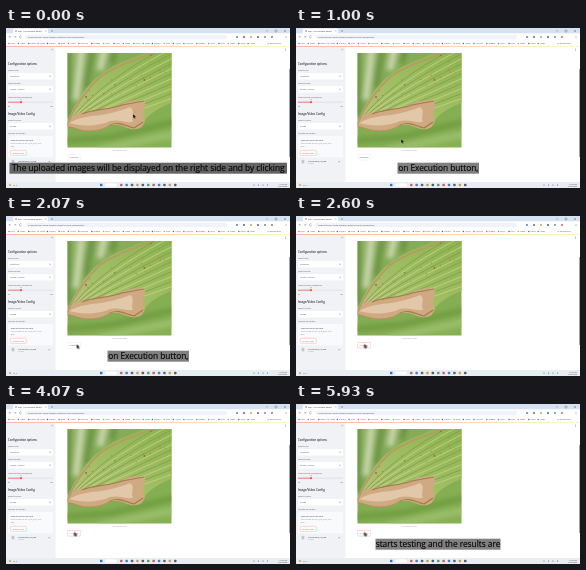
An HTML page for the animation above (6 s loop, 284 by 160 pixels).

```html
<!DOCTYPE html>
<html lang="en">
<head>
<meta charset="utf-8">
<title>Leaf check demo</title>
<style>
html, body { margin: 0; width: 100%; height: 100%; overflow: hidden; background: #fff; }
svg { display: block; width: 284px; height: 160px; }
text { font-family: "Open Sans", "Noto Sans", sans-serif; }
.caption text { font-size: 8.3px; text-anchor: middle; fill: #050505; stroke: #050505; stroke-width: .15; }
</style>
</head>
<body>
<svg id="stage" viewBox="0 0 284 160" xmlns="http://www.w3.org/2000/svg">
  <defs>
    <clipPath id="photo"><rect x="61.5" y="25" width="104" height="94.5"/></clipPath>
    <clipPath id="blade"><use href="#leaf"/></clipPath>
    <linearGradient id="back" x2=".6" y2="1">
      <stop offset="0" stop-color="#8fb263"/>
      <stop offset=".4" stop-color="#83aa55"/>
      <stop offset="1" stop-color="#86b052"/>
    </linearGradient>
    <linearGradient id="green" x1=".1" y1="1" x2=".9" y2="0">
      <stop offset="0" stop-color="#c0bf82"/>
      <stop offset=".4" stop-color="#a3bf66"/>
      <stop offset="1" stop-color="#8fb450"/>
    </linearGradient>
    <linearGradient id="accent">
      <stop offset="0" stop-color="#ff8a7a"/>
      <stop offset="1" stop-color="#fff3b0"/>
    </linearGradient>
    <filter id="soft"><feGaussianBlur stdDeviation="2.5"/></filter>
    <filter id="haze"><feGaussianBlur stdDeviation=".7"/></filter>
    <path id="leaf" d="M61 96C66 82 74 67 86 54C97 43 110 36 124 31L140 24H167V74C155 79 144 85 139 92C138 99 132 102 126 101C118 99 112 95 104 97C96 103 84 104 75 102L61 98Z"/>
  </defs>

  <g id="chrome"></g>
  <g id="sidebar"></g>

  <g clip-path="url(#photo)">
    <rect x="61" y="25" width="105" height="95" fill="url(#back)"/>
    <g filter="url(#soft)" fill="none" stroke-width="6">
      <path d="M76 18L70 72M99 18L94 42" stroke="#cfd9b4"/>
      <path d="M62 18V88M87 18L80 60M110 18L106 36" stroke="#6b9443"/>
      <path d="M58 113L105 109L168 94" stroke="#6f9d40"/>
      <path d="M92 122L170 106" stroke="#9cc070"/>
    </g>
    <g filter="url(#haze)">
      <use href="#leaf" fill="url(#green)"/>
      <g clip-path="url(#blade)">
        <g id="veins" fill="none"></g>
        <path d="M61 90C70 86 77 83 87 84C97 80 108 81 116 76C124 72 133 71 139 74C140 81 134 85 139 92L134 104H61Z" fill="#cfa981"/>
        <path d="M63 95C74 89 84 88 95 87C106 85 114 83 124 79C130 82 124 89 127 94C119 95 112 91 104 93C94 98 76 99 63 95Z" fill="#e2c7a9"/>
        <path d="M76 86C88 81 103 82 116 77L138 73M104 97C114 93 119 98 128 100L137 94" fill="none" stroke="#a87a4b" stroke-width="1.2"/>
        <path d="M61 97C68 80 80 62 94 49C109 38 127 33 147 25" fill="none" stroke="#b59c66" stroke-width="1.8"/>
        <g id="spots"></g>
      </g>
      <path d="M61 98L75 102C84 104 96 103 104 97" fill="none" stroke="#b58a58" stroke-width=".8"/>
    </g>
  </g>

  <g id="page"></g>
  <g id="captions"></g>
  <g id="cursor">
    <path id="arrow" d="M0 0V4.3L1.1 3.4L1.9 5L2.7 4.6L2 3.1H3.3Z" fill="#111" stroke="#fff" stroke-width=".2"/>
    <path id="hand" d="M.2 0Q.9 -.4 1 .3V1.2L2.3 1.5Q2.7 1.7 2.5 2.3L2.1 3.2H.6L-.5 2Q-.4 1.4 .2 1.8Z" fill="#555" stroke="#111" stroke-width=".5"/>
  </g>
</svg>
<script>
const LOOP = 6000;
const $ = id => document.getElementById(id);

function add(parent, tag, attrs, content) {
  const el = document.createElementNS("http://www.w3.org/2000/svg", tag);
  for (const key in attrs) el.setAttribute(key, attrs[key]);
  if (content) el.textContent = content;
  return parent.appendChild(el);
}
const rect = (g, x, y, width, height, fill, more) =>
  add(g, "rect", { x, y, width, height, fill, ...more });
const dot = (g, cx, cy, r, fill) => add(g, "circle", { cx, cy, r, fill });
const line = (g, d, stroke, width = .4) =>
  add(g, "path", { d, stroke, "stroke-width": width, fill: "none" });
const label = (g, x, y, text, size = 2.1, fill = "#4d505a", more) =>
  add(g, "text", { x, y, "font-size": size, fill, ...more }, text);

function seeded(seed) {
  return () => (seed = seed * 16807 % 2147483647) / 2147483647;
}

function drawChrome(g) {
  const tints = ["#c9625a", "#4f80c0", "#5c6470", "#c9a050", "#555c68", "#5b9a75"];
  const tint = i => tints[i % tints.length];

  rect(g, 0, 0, 284, 5.5, "#d6e2f2");
  rect(g, 7, .8, 35, 5, "#fff", { rx: 1.2 });
  dot(g, 10, 3, .8, "#d95044");
  label(g, 12, 3.8, "app · Leaf disease detect", 2.1, "#333");
  line(g, "M39 2.4l1.2 1.2m0 -1.2l-1.2 1.2M45 3h2m-1 -1v2", "#555", .3);
  line(g, "M260 3h2M269 2h2v2h-2ZM278 2l2 2m0 -2l-2 2", "#444", .3);

  rect(g, 0, 5.5, 284, 7, "#fff");
  line(g, "M5 9H2.8l1 -1M8 9h2.2l-1 -1M15.5 8a1.2 1.2 0 1 0 .2 1.6", "#666");
  rect(g, 19, 6.8, 202, 4.4, "#f0f3f8", { rx: 2.2 });
  label(g, 22, 9.8, "localhost:8501/#leaf-disease-detection-and-classification", 2.15, "#444");
  for (let i = 0; i < 6; i++) dot(g, 231 + i * 7, 9, 1, tint(i + 1));
  dot(g, 280, 9, .5, "#555");

  rect(g, 0, 12.5, 284, 6, "#fff");
  const marks = ["Mail", "Video", "Maps", "News", "Papers", "Data", "Notes", "Courses", "Images", "Tools"];
  for (let i = 0, x = 3; x < 247; i++) {
    const name = marks[i % marks.length];
    dot(g, x, 15.4, .75, tint(i * 5));
    label(g, x + 1.6, 16.2, name, 2.1, "#555");
    x += 4.5 + name.length * 1.2;
  }
  label(g, 261, 16.2, "All Bookmarks", 2.1, "#555");
  rect(g, 0, 18.2, 284, .7, "url(#accent)");

  rect(g, 0, 154, 284, 6, "#e8edf4");
  dot(g, 4, 157, 1.1, "#d9ad4c");
  label(g, 7, 157.8, "24°C", 1.9);
  rect(g, 94, 155.8, 2.4, 2.4, "#2475c7");
  rect(g, 99, 155.5, 12, 3, "#fff", { rx: 1.5 });
  for (let i = 0; i < 11; i++) rect(g, 114 + i * 5.4, 155.7, 2.5, 2.5, tint(i), { rx: .8 });
  for (let i = 0; i < 4; i++) dot(g, 248 + i * 4.5, 157, .6, "#59616d");
  label(g, 281, 156.8, "10:42 AM", 1.8, "#333", { "text-anchor": "end" });
  label(g, 281, 159, "12/05/2023", 1.8, "#333", { "text-anchor": "end" });
}

function select(g, y, title, value) {
  label(g, 2, y - 2.4, title);
  rect(g, 2, y, 45, 6.6, "#fff", { rx: .8 });
  label(g, 4, y + 4.1, value);
  line(g, `M43.2 ${y + 2.8}l.9 .9l.9 -.9`, "#444");
}

function drawSidebar(g) {
  const bold = { "font-weight": 600 };
  rect(g, 0, 18.9, 49.5, 135.1, "#f0f2f6");
  line(g, "M45.4 20.7l1.6 1.6m0 -1.6l-1.6 1.6", "#777", .35);
  label(g, 2, 37.3, "Configuration options", 2.75, "#30333f", bold);
  select(g, 45, "Select Task", "Detection");
  select(g, 58, "Select Model", "yolov8_custom");
  label(g, 2, 69.7, "Select Model Confidence");
  label(g, 15, 72.4, "25", 2, "#ff4b4b", { "text-anchor": "middle" });
  line(g, "M2 74.2H47", "#d3d6dd", .6);
  line(g, "M2 74.2H15", "#ff4b4b", .7);
  dot(g, 15, 74.2, 1.1, "#ff4b4b");
  label(g, 2, 78.8, "25", 1.9);
  label(g, 47, 78.8, "100", 1.9, "#4d505a", { "text-anchor": "end" });
  label(g, 2, 86.8, "Image/Video Config", 2.85, "#30333f", bold);
  select(g, 95, "Select Source", "Image");
  label(g, 2, 106, "Choose an image...");
  rect(g, 2, 108, 45, 21.5, "#f9fafc", { rx: .8 });
  label(g, 4.7, 113, "Drag and drop file here", 2.1, "#30333f");
  label(g, 4.7, 116, "Limit 200MB per file • JPG, JPEG, PNG,", 1.8, "#858993");
  label(g, 4.7, 118.5, "BMP", 1.8, "#858993");
  rect(g, 4.3, 122.3, 16, 5, "#fff", { rx: .8, stroke: "#ff8585", "stroke-width": .35 });
  label(g, 12.3, 125.6, "Browse files", 2.1, "#ff4b4b", { "text-anchor": "middle" });
  rect(g, 5.5, 131.8, 3, 3.6, "#d5d8df", { rx: .5 });
  line(g, "M6.2 133h1.6M6.2 134.2h1.6", "#777b85", .4);
  label(g, 12, 133.7, "leaf-sample (14).jpg", 2, "#30333f");
  label(g, 12, 136.4, "21.4KB", 1.7, "#858993");
  line(g, "M42.5 133l1.3 1.3m0 -1.3l-1.3 1.3", "#777", .4);
}

function drawLeafDetails() {
  for (let i = 0; i < 12; i++) {
    const y = 30 + i * 5;
    line($("veins"), `M61 97Q${88 + i * 2.5} ${57 + i * 3} 167 ${y - 15}`,
      i % 2 ? "#bdd080" : "#7fa64a", 1);
  }
  const rnd = seeded(41);
  for (let i = 0; i < 38; i++) {
    const x = 80 + rnd() * 80;
    const y = 112 - x * .5 + (rnd() - .5) * 28;
    dot($("spots"), x, y, .3 + rnd() * .6, i % 3 ? "#ad8c58" : "#8a6a3a");
  }
}

function drawPage(g) {
  dot(g, 279.5, 21, .4, "#555");
  dot(g, 279.5, 22.4, .4, "#555");
  rect(g, 283.2, 41, .8, 88, "#8b8e94");
  label(g, 113.5, 123, "Uploaded Image", 1.9, "#92959d", { "text-anchor": "middle" });
  const button = (color, edge) => {
    const b = add(g, "g", {});
    rect(b, 61.7, 126.5, 13, 5.5, "#fff", { rx: .8, stroke: edge, "stroke-width": .35 });
    label(b, 68.2, 130, "Execution", 2.1, color, { "text-anchor": "middle" });
    return b;
  };
  button("#555963", "#e2e4e8");
  return button("#ff6a6a", "#ff9a9a");
}

// Visible from one time up to another, with hard cuts.
function show(el, from, to) {
  const steps = [[0, from === 0], [from, true], [to, false], [LOOP, to === LOOP]]
    .filter(([t], i) => !(i === 0 && from === 0) && !(i === 2 && to === LOOP));
  el.animate(steps.map(([t, on]) => ({
    offset: t / LOOP, opacity: on ? 1 : 0, easing: "steps(1, end)"
  })), { duration: LOOP, iterations: Infinity });
}

drawChrome($("chrome"));
drawSidebar($("sidebar"));
drawLeafDetails();
const hover = drawPage($("page"));

// text, left, right, box colour, start, end
const captions = [
  ["The uploaded images will be displayed on the right side and by clicking", 3.5, 281, "#646464", 0, 340],
  ["on Execution button,", 101.5, 183, "#808080", 340, 2330],
  ["starts testing and the results are", 79.5, 204.5, "#808080", 4400, LOOP]
];
for (const [text, left, right, color, from, to] of captions) {
  const g = add($("captions"), "g", { class: "caption" });
  rect(g, left, 134.7, right - left, 11, color);
  add(g, "text", { x: (left + right) / 2, y: 143 }, text);
  show(g, from, to);
}

const ARRIVE = 2200;
const path = [[0, 127, 86], [1000, 105, 111], [1530, 99, 125], [ARRIVE, 68.3, 128.6], [LOOP, 68.3, 128.6]];
$("cursor").animate(path.map(([t, x, y]) => ({
  offset: t / LOOP, transform: `translate(${x}px, ${y}px)`, easing: "ease-in-out"
})), { duration: LOOP, iterations: Infinity });
show(hover, ARRIVE - 60, LOOP);
show($("arrow"), 0, ARRIVE - 60);
show($("hand"), ARRIVE - 60, LOOP);
</script>
</body>
</html>
```
